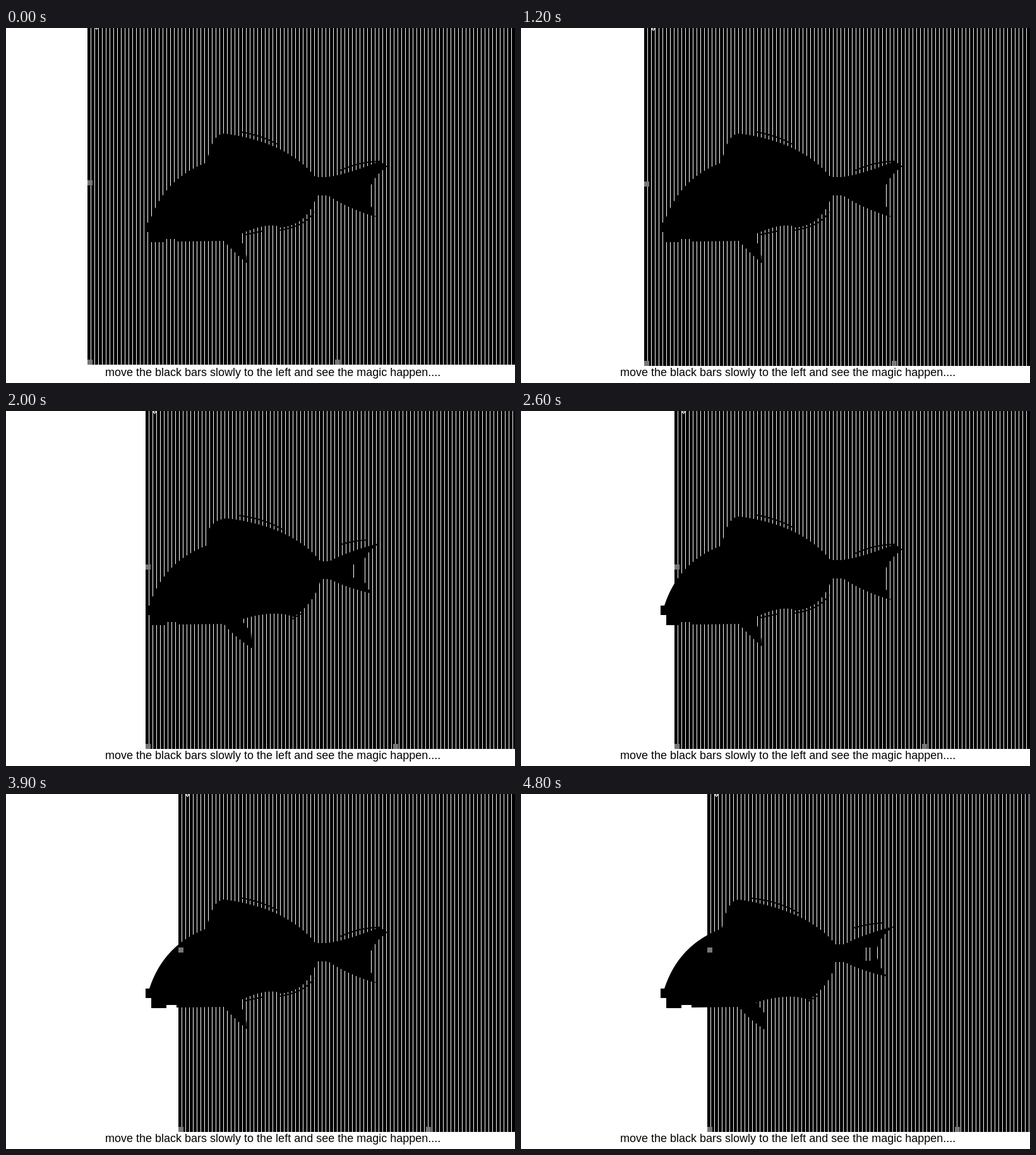
An HTML page with a canvas that plays this animation: 806x562 px, repeating every 5100 ms.

```html
<!DOCTYPE html>
<html lang="en">
<head>
<meta charset="utf-8">
<title>Moving bars</title>
<style>
  html, body { margin: 0; width: 100%; height: 100%; overflow: hidden; background: #fff; }
  canvas, svg { position: absolute; left: 0; top: 0; width: 806px; height: 562px; }
  text { font: 18px "Liberation Sans", Arial, sans-serif; }
</style>
</head>
<body>
<canvas id="stage" width="806" height="562"></canvas>
<svg viewBox="0 0 806 562"><text x="157" y="551">move the black bars slowly to the left and see the magic happen....</text></svg>
<script>
const W = 806, H = 562, PERIOD = 6, STEP = 100, LAST = 48, LOOP = 5100;

// The drag slows down by hand: [step, left edge of the bars]
const DRAG = [[0, 129], [6, 165], [7, 173], [12, 195], [18, 217], [20, 221],
  [24, 237], [30, 253], [31, 257], [39, 273], [42, 283], [48, 295]];

// Outline pieces, clockwise from the chin
const HEAD = 'M345 337 L270 338 V334 H254 V339 H230 V323 H221 V308 H227 Q250 238 318 213';
const SLOPED_FIN = 'Q326 168 345 167';
const UPRIGHT_FIN = 'L322 186 Q332 170 352 170';

const SPREAD = {
  back: 'Q445 180 490 236',
  tail: 'H508 Q540 232 592 211 L604 219 Q574 240 573 270 L585 299 Q540 285 510 265 H492',
  belly: 'Q478 312 435 316 Q418 306 374 325',
  pelvic: 'V340 Q381 350 381 372 Q360 354 345 337Z',
  fringe: 'M370 164 Q405 170 430 184 M528 226 Q560 211 592 211 M380 327 L408 321 M434 320 Q474 314 488 291'
};
const FORKED = {
  back: 'Q455 184 498 238',
  tail: 'H512 Q542 222 592 209 Q563 228 563 252 Q564 270 579 289 Q540 280 512 266 H498',
  belly: 'Q492 300 456 326 Q425 314 372 330',
  pelvic: 'L388 350 390 376 Q360 356 345 337Z M545 243 V264 H553 V243Z',
  fringe: 'M366 165 Q410 170 442 190 M528 212 Q550 205 574 204 M452 330 L472 318'
};

const POSES = [
  { phase: 0, fin: SLOPED_FIN, rear: FORKED },
  { phase: 2, fin: SLOPED_FIN, rear: SPREAD },
  { phase: 4, fin: UPRIGHT_FIN, rear: FORKED }
];

const ctx = document.getElementById('stage').getContext('2d');

// Each pose fills every third pair of columns, so the slits show one pose at a time.
function makeUnderlay() {
  const layer = document.createElement('canvas');
  layer.width = W;
  layer.height = H;
  const c = layer.getContext('2d');
  c.lineWidth = 2;
  for (const { phase, fin, rear } of POSES) {
    const { back, tail, belly, pelvic, fringe } = rear;
    c.save();
    c.beginPath();
    for (let x = phase; x < W; x += PERIOD) c.rect(x, 0, 2, H);
    c.clip();
    c.filter = 'blur(0.6px)';
    c.fill(new Path2D([HEAD, fin, back, tail, belly, pelvic].join(' ')), 'evenodd');
    c.stroke(new Path2D(fringe));
    c.restore();
  }
  return layer;
}

function leftAt(step) {
  const i = Math.max(1, DRAG.findIndex(([s]) => s >= step));
  const [s0, x0] = DRAG[i - 1], [s1, x1] = DRAG[i];
  const x = x0 + (x1 - x0) * (step - s0) / (s1 - s0);
  return 2 * Math.round((x - 1) / 2) + 1;
}

function drawBars(left, bottom) {
  ctx.fillStyle = '#000';
  for (let x = left; x < W; x += PERIOD) ctx.fillRect(x, 0, PERIOD - 1, bottom);
}

function drawHandles(left, bottom) {
  ctx.fillStyle = '#777';
  for (const [x, y] of [[0, bottom - 292], [0, bottom - 8], [392, bottom - 8]]) {
    ctx.fillRect(left + x, y, 8, 8);
  }
  ctx.save();
  ctx.translate(left + 14.5, bottom - 533.5);
  ctx.rotate(Math.PI / 4);
  ctx.fillStyle = '#555';
  ctx.strokeStyle = '#fff';
  ctx.fillRect(-1.75, -1.75, 3.5, 3.5);
  ctx.strokeRect(-1.75, -1.75, 3.5, 3.5);
  ctx.restore();
}

const underlay = makeUnderlay();
const start = performance.now();

function draw() {
  const time = (performance.now() - start) % LOOP;
  const step = Math.min(LAST, Math.floor(time / STEP));
  const left = leftAt(step);
  const bottom = step < 10 ? 533 : 535;
  ctx.fillStyle = '#fff';
  ctx.fillRect(0, 0, W, H);
  ctx.drawImage(underlay, 0, 0);
  drawBars(left, bottom);
  drawHandles(left, bottom);
  requestAnimationFrame(draw);
}
draw();
</script>
</body>
</html>
```
